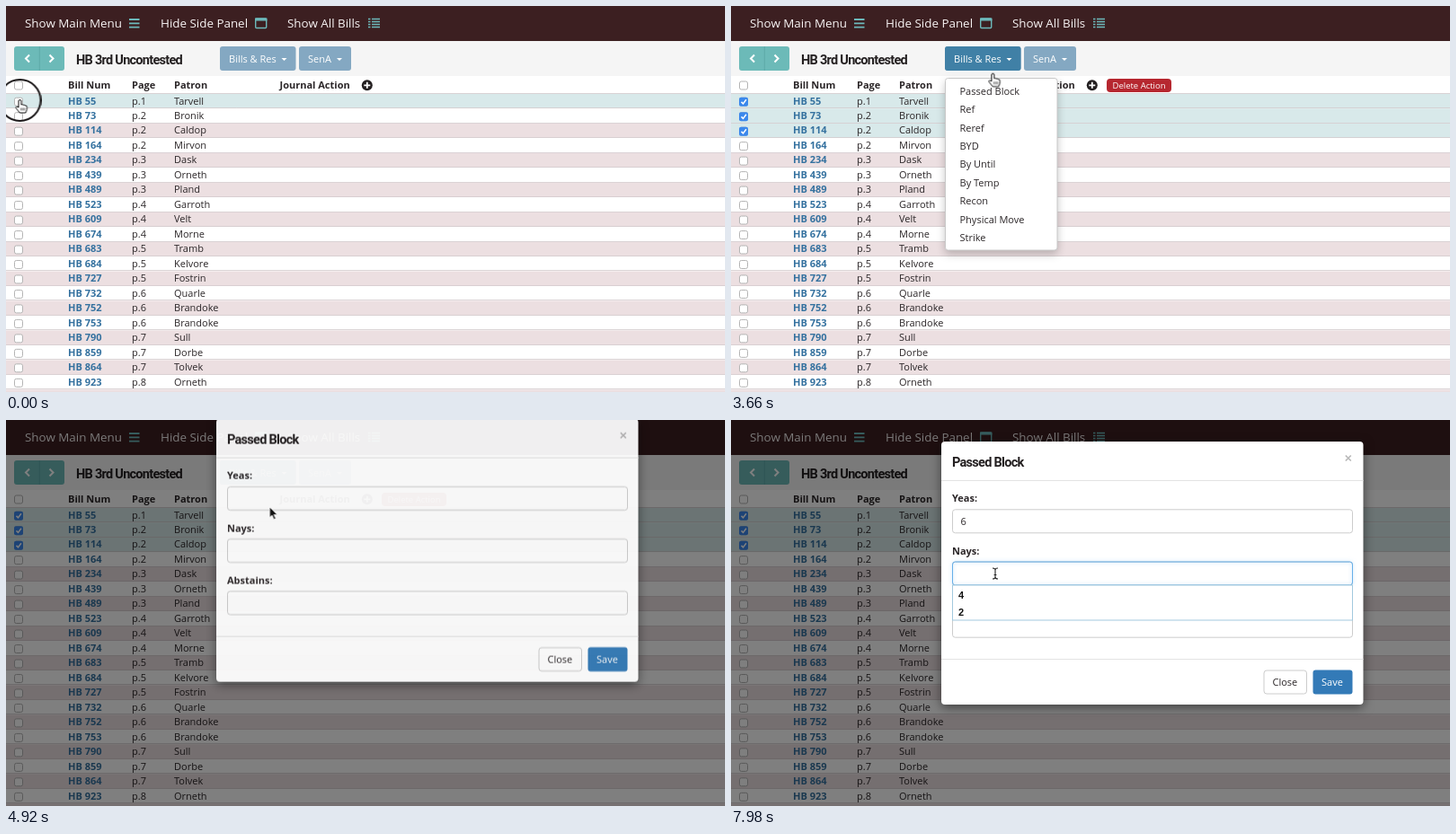
Animation of 800x430 px, one loop 8 s. Source, as an HTML page:

```html
<!DOCTYPE html>
<html lang="en">
<head>
<meta charset="utf-8">
<title>Bill list</title>
<style>
  html, body { margin: 0; width: 100%; height: 100%; overflow: hidden; background: #fff; }
  svg { display: block; width: 800px; height: 430px; }
  text { font: 11px "Open Sans", "Noto Sans", sans-serif; fill: #2b2628; white-space: pre; }
  .bold { font-weight: 700; }
  .link { font-weight: 700; fill: #34719f; }
  .nav { font-size: 13.4px; fill: #f8f4f4; }
  .title { font: 700 14.5px Roboto, "Open Sans", sans-serif; letter-spacing: -.05em; fill: #231f20; }
  .white { fill: #fff; }
  .small { font-size: 9.5px; fill: #fff; }
  .option { font: 700 11px "Liberation Sans", Arial, sans-serif; fill: #111; }
  .box { fill: #fff; stroke: #b4b4b4; }
  .input { fill: #fff; stroke: #ccc; }
  .focus { fill: none; stroke: #66afe9; filter: drop-shadow(0 0 2px rgba(102, 175, 233, .6)); }
  .sheet { filter: drop-shadow(0 3px 6px rgba(0, 0, 0, .5)); }
  .popup { filter: drop-shadow(0 4px 5px rgba(0, 0, 0, .22)); }
  .caret { stroke: #333; }
</style>
</head>
<body>
<svg id="stage" viewBox="0 0 800 430"></svg>
<script>
const LOOP = 8000;
const rules = [];
const bills = [
  [55, 1, 'Tarvell'], [73, 2, 'Bronik'], [114, 2, 'Caldop'], [164, 2, 'Mirvon'],
  [234, 3, 'Dask'], [439, 3, 'Orneth'], [489, 3, 'Pland'], [523, 4, 'Garroth'],
  [609, 4, 'Velt'], [674, 4, 'Morne'], [683, 5, 'Tramb'], [684, 5, 'Kelvore'],
  [727, 5, 'Fostrin'], [732, 6, 'Quarle'], [752, 6, 'Brandoke'], [753, 6, 'Brandoke'],
  [790, 7, 'Sull'], [859, 7, 'Dorbe'], [864, 7, 'Tolvek'], [923, 8, 'Orneth']
];
const actions = ['Passed Block', 'Ref', 'Reref', 'BYD', 'By Until', 'By Temp', 'Recon', 'Physical Move', 'Strike'];

const text = (x, y, s, cls = '') => `<text x="${x}" y="${y}" class="${cls}">${s}</text>`;
const rect = (x, y, w, h, attrs = '') => `<rect x="${x}" y="${y}" width="${w}" height="${h}" ${attrs}/>`;
const path = (d, attrs = '') => `<path d="${d}" fill="none" ${attrs}/>`;
const group = (id, body, attrs = '') => `<g id="${id}" ${attrs}>${body}</g>`;

// Keyframes from [ms, declarations] pairs.
function animate(id, easing, ...tracks) {
  const names = tracks.map((track, i) => {
    const steps = track.map(([ms, css]) => `${ms / LOOP * 100}% { ${css} }`).join(' ');
    rules.push(`@keyframes ${id}${i} { ${steps} }`);
    return `${id}${i} ${LOOP}ms ${easing} infinite`;
  });
  rules.push(`#${id} { animation: ${names.join(', ')}; }`);
}

// Visible only within the given [from, to] spans.
function show(id, ...spans) {
  const track = spans[0][0] > 0 ? [[0, 'opacity: 0']] : [];
  for (const [from, to] of spans) {
    track.push([from, 'opacity: 1']);
    if (to < LOOP) track.push([to, 'opacity: 0']);
  }
  animate(id, 'step-end', track);
}

const caretDown = (x, y) => `<path d="M${x} ${y}h6l-3 3z" fill="#fff"/>`;

function header() {
  const teal = 'stroke="#6cb9bb" stroke-width="1.8"';
  let list = '';
  for (const y of [14.5, 17.5, 20.5, 23.5]) list += path(`M403 ${y}h2.5M407 ${y}h9`, 'stroke="#6cb9bb" stroke-width="1.7"');
  return rect(0, 0, 800, 39, 'fill="#3c1f21"') +
    text(21, 24, 'Show Main Menu', 'nav') + path('M137 15h11.5M137 19.3h11.5M137 23.6h11.5', teal) +
    text(172, 24, 'Hide Side Panel', 'nav') +
    rect(277.7, 14, 12, 10.5, 'rx="1" fill="none" stroke="#6cb9bb" stroke-width="1.4"') + path('M277 15h13.4', 'stroke="#6cb9bb" stroke-width="3"') +
    text(313, 24, 'Show All Bills', 'nav') + list;
}

function toolbar() {
  const button = (x, w, fill, label) => rect(x, 45, w, 27, `rx="3" fill="${fill}"`) +
    text(x + 10, 62.5, label, 'white') + caretDown(x + w - 16, 58);
  return rect(0, 39, 800, 39, 'fill="#f5f5f5"') +
    rect(9, 45, 56, 27, 'rx="3" fill="#6cbab8"') + path('M37.3 45v27', 'stroke="#5eaaa8"') +
    path('M26 54.5l-4 4 4 4M48.5 54.5l4 4-4 4', 'stroke="#fff" stroke-width="2"') +
    text(78, 64.5, 'HB 3rd Uncontested', 'title') +
    button(238, 84.5, '#84a8c2', 'Bills &amp; Res') +
    button(326, 58, '#84a8c2', 'SenA') +
    group('enabled', button(238, 84.5, '#4080a6', 'Bills &amp; Res'));
}

const checkbox = y => rect(9.5, y - 4.5, 9, 9, 'rx="2" class="box"');

function table() {
  let out = checkbox(88.5) + text(69, 92, 'Bill Num', 'bold') + text(140, 92, 'Page', 'bold') +
    text(187, 92, 'Patron', 'bold') + text(304.5, 92, 'Journal Action', 'bold') +
    '<circle cx="401.8" cy="88.3" r="6" fill="#231f20"/>' +
    path('M398.3 88.3h7M401.8 84.8v7', 'stroke="#fff" stroke-width="1.8"') +
    group('remove', rect(418, 81, 72, 15, 'rx="4" fill="#b6272f"') + text(424.5, 92, 'Delete Action', 'small'));
  for (let i = 0; i <= bills.length; i++) {
    const y = 97.7 + i * 16.48;
    out += rect(0, y, 800, 16.48, `fill="${i % 2 ? '#fff' : '#ecdfe1'}"`);
    if (i < 3) out += group('glow' + i, rect(0, y, 800, 16.48, 'fill="#d8e9ea"'));
    out += path(`M0 ${Math.round(y) - .5}h800`, 'stroke="#d3cbcd" stroke-width=".8"');
    if (i === bills.length) break;
    const [num, page, patron] = bills[i];
    const base = y + 11.8;
    out += checkbox(y + 9) + text(69, base, 'HB ' + num, 'link') +
      text(140, base, 'p.' + page) + text(187, base, patron);
    if (i < 3) out += group('check' + i, rect(9, y + 4, 10, 10, 'rx="2" fill="#3b88ec"') +
      path(`M11.5 ${y + 9.2}l2 2 3.4-4.6`, 'stroke="#fff" stroke-width="1.5"'));
  }
  return out;
}

function menu() {
  return group('menu', rect(238.5, 80.5, 124.5, 191.5, 'rx="3" fill="#fff" stroke="#c8c8c8" class="popup"') +
    group('pick', rect(239, 85, 123.5, 20, 'fill="#f2f2f2"')) +
    actions.map((label, i) => text(254.5, 98.8 + i * 20.4, label)).join(''));
}

function suggestions(id, y, options) {
  return group(id, rect(246.5, y, 445, 39, 'fill="#fff" stroke="#a2c9de"') +
    options.map((s, i) => text(253, y + 15.2 + i * 18.7, s, 'option')).join(''));
}

function dialog() {
  const field = (label, y) => text(246, y, label, 'bold') + rect(246.5, y + 8.5, 445, 26, 'rx="3" class="input"');
  const focus = (id, y) => group(id, rect(246.5, y, 445, 26, 'rx="3" class="focus"'));
  const caret = (id, x, y) => group(id, path(`M${x} ${y}v14`, 'class="caret"'));
  return group('dialog',
    rect(234, 24, 469.5, 293, 'rx="4" fill="#fff" class="sheet"') +
    path('M234 67.5h469.5M234 266.5h469.5', 'stroke="#e3e3e3"') +
    text(246, 51.5, 'Passed Block', 'title') +
    path('M683.8 39.5l6 6m0-6l-6 6', 'stroke="#b9b9b9" stroke-width="1.7"') +
    field('Yeas:', 91.3) + field('Nays:', 149.5) + field('Abstains:', 207.7) +
    rect(593, 279, 47.5, 26, 'rx="3" class="input"') + text(602.5, 296, 'Close') +
    rect(647.5, 278.5, 44, 27, 'rx="3" fill="#337ab7"') + text(657, 296, 'Save', 'white') +
    focus('yeas', 99.8) + focus('nays', 158) +
    group('entry', text(255.5, 117.3, '6')) +
    caret('caretA', 256.5, 106.5) + caret('caretB', 263.5, 106.5) + caret('caretC', 256.5, 164) +
    suggestions('listA', 126, ['70', '4']) + suggestions('listB', 184, ['4', '2']));
}

function pointer() {
  const ink = 'stroke="#111" stroke-width="1" stroke-linejoin="round"';
  return group('pointer',
    group('ring', '<circle r="23" fill="none" stroke="#1c191a" stroke-width="2"/>') +
    group('arrow', `<path d="M0 0v11.5l2.7-2.4 2 4.6 2-.9-2-4.4h3.6z" fill="#111" stroke="#fff" stroke-width=".7"/>`) +
    group('hand', `<path d="M-1.5 8V1Q-1.5-.5 0-.5T1.4 1V5q1.2-.8 2.3.3 1.2-.6 2.1.6 2-.3 2 1.5v2.8L6.4 14H-.2L-4.3 8.8q-.6-1.5.8-1.8z" fill="#fff" ${ink}/>` +
      path('M1.2 8.5v3M3.2 8.5v3M5.1 8.5v3', 'stroke="#111" stroke-width=".7"')) +
    group('beam', path('M-3-6q3 0 3 2 0-2 3-2M0-4.5v9M-3 6q3 0 3-2 0 2 3 2M-1.4 1.5h2.8', 'stroke="#222" stroke-width="1.1"')));
}

document.getElementById('stage').innerHTML = header() + toolbar() + table() + menu() +
  group('shade', rect(0, 0, 800, 430)) + dialog() + pointer();

show('enabled', [120, LOOP]);
show('remove', [120, LOOP]);
show('glow1', [640, LOOP]);
show('glow2', [1350, LOOP]);
show('check0', [120, LOOP]);
show('check1', [1020, LOOP]);
show('check2', [1800, LOOP]);
show('menu', [3240, 4650]);
show('pick', [3720, 4650]);
show('ring', [0, 120], [900, 1020], [1680, 1800], [3120, 3240], [4500, 4680], [5520, 5640], [7380, 7500]);
show('hand', [0, 2300], [2760, 4690]);
show('arrow', [2300, 2760], [4690, 5240]);
show('beam', [5240, LOOP]);
show('yeas', [5520, 7380]);
show('nays', [7380, LOOP]);
show('listA', [5640, 6240]);
show('listB', [7560, LOOP]);
show('entry', [6240, LOOP]);
show('caretA', [5520, 6020]);
show('caretB', [6240, 6740], [7240, 7380]);
show('caretC', [7380, 7880]);

animate('shade', 'linear', [[0, 'opacity: 0'], [4650, 'opacity: 0'], [4800, 'opacity: .5'], [LOOP, 'opacity: .5']]);
animate('dialog', 'linear',
  [[0, 'opacity: 0'], [4780, 'opacity: 0'], [4930, 'opacity: 1'], [LOOP, 'opacity: 1']],
  [[0, 'transform: translateY(-73px)'], [4780, 'transform: translateY(-73px); animation-timing-function: ease-out'],
    [5080, 'transform: translateY(0)'], [LOOP, 'transform: translateY(0)']]);

const stops = [
  [0, 15.5, 105], [480, 15.5, 105], [780, 15.5, 122], [1200, 15.5, 122], [1500, 15.5, 138],
  [1980, 15.5, 138], [2580, 319.5, 70], [2700, 319.5, 70], [2940, 290, 61], [3420, 290, 61],
  [3960, 293.4, 97], [5160, 293.4, 97], [5340, 295, 110], [6780, 295, 110], [7200, 294, 171], [LOOP, 294, 171]
];
animate('pointer', 'ease-in-out', stops.map(([ms, x, y]) => [ms, `transform: translate(${x}px, ${y}px)`]));

const style = document.createElement('style');
style.textContent = rules.join('\n');
document.head.append(style);
</script>
</body>
</html>
```
